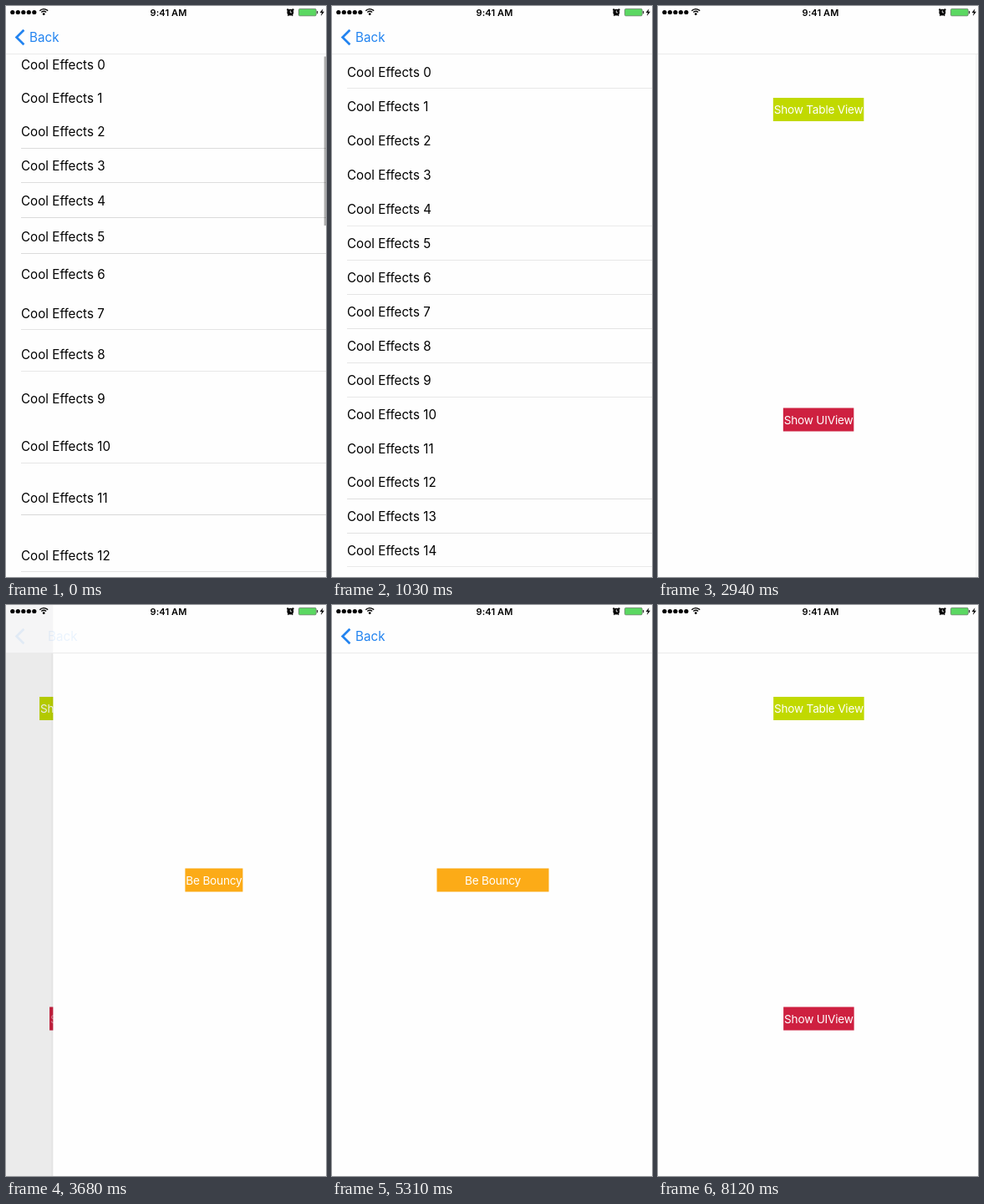
Write an HTML page with a canvas that moves like this. It is 383 px wide and 684 px high and loops after 8520 ms.

```html
<!DOCTYPE html>
<html lang="en">
<head>
<meta charset="utf-8">
<title>Cool Effects</title>
<style>
  html, body { margin: 0; width: 100%; height: 100%; overflow: hidden; background: #fefefe; }
  canvas { display: block; width: 383px; height: 684px; }
</style>
</head>
<body>
<canvas id="stage" width="383" height="684"></canvas>
<script>
const W = 383, H = 684, LOOP = 8520, TICK = 147.6;
const PAPER = '#fefefe', BLUE = '#2384f0';
const ctx = document.getElementById('stage').getContext('2d');

const clamp = v => Math.max(0, Math.min(1, v));
const ramp = (t, from, to) => clamp((t - from) / (to - from));

// Share of the way still to go, critically damped.
function settle(ms) {
  const p = 18.26 * Math.max(0, ms) / 1000;
  return (1 + p) * Math.exp(-p);
}

function rect(x, y, w, h, fill) {
  ctx.fillStyle = fill;
  ctx.fillRect(x, y, w, h);
}

function text(str, x, y, { size = 15.2, color = '#000', align = 'left', weight = 400, spacing = 0 } = {}) {
  ctx.font = `${weight} ${size}px Inter, Roboto, sans-serif`;
  ctx.letterSpacing = spacing + 'px';
  ctx.textAlign = align;
  ctx.fillStyle = color;
  ctx.fillText(str, x, y);
}

function path(points, { stroke, fill, width = 1 }) {
  ctx.beginPath();
  points.forEach(([x, y]) => ctx.lineTo(x, y));
  if (fill) { ctx.fillStyle = fill; ctx.fill(); }
  if (stroke) { ctx.strokeStyle = stroke; ctx.lineWidth = width; ctx.stroke(); }
}

function disc(x, y, r, fill = '#000') {
  ctx.beginPath();
  ctx.arc(x, y, r, 0, 2 * Math.PI);
  ctx.fillStyle = fill;
  ctx.fill();
}

function button(label, cx, y, width, fill, titleAlpha = 1) {
  rect(cx - width / 2, y, width, 28, fill);
  text(label, cx, y + 19, { size: 13.6, color: `rgba(255,255,255,${titleAlpha})`, align: 'center', spacing: -0.2 });
}

function statusBar() {
  for (let i = 0; i < 5; i++) disc(7.8 + 6.5 * i, 7.5, 2.6);
  ctx.strokeStyle = '#000';
  ctx.lineWidth = 1.4;
  for (const r of [3.9, 6.6]) {
    ctx.beginPath();
    ctx.arc(45.2, 10.2, r, -2.4, -0.74);
    ctx.stroke();
  }
  disc(45.2, 9.7, 1.4);
  text('9:41 AM', 194.5, 11.8, { size: 11, weight: 600, align: 'center', spacing: 0.1 });

  disc(340.3, 7.6, 3.9);
  disc(337.2, 4.4, 1.2);
  disc(343.4, 4.4, 1.2);
  path([[337.5, 11.8], [338.6, 10]], { stroke: '#000', width: 1.3 });
  path([[343.1, 11.8], [342, 10]], { stroke: '#000', width: 1.3 });
  path([[340.3, 5.3], [340.3, 7.9], [342.3, 7.9]], { stroke: '#fff', width: 0.8 });

  ctx.beginPath();
  ctx.roundRect(350.4, 3.4, 20.8, 8.4, 1.3);
  ctx.fillStyle = '#5bd862';
  ctx.fill();
  ctx.strokeStyle = '#59705a';
  ctx.lineWidth = 0.7;
  ctx.stroke();
  rect(372, 6, 1.2, 3.2, '#333');
  path([[379.4, 3.2], [375.6, 8.1], [378, 8.1], [376.8, 12], [381, 6.8], [378.5, 6.8]], { fill: '#000' });
}

function navBar(cover, backAlpha) {
  rect(0, 0, W, 57, PAPER);
  rect(0, 0, W * (1 - cover), 57, `rgba(60,70,85,${0.055 * cover})`);
  rect(0, 57, W, 1, '#ebebeb');
  ctx.globalAlpha = backAlpha;
  path([[21.4, 28.8], [12.6, 37.5], [21.4, 46.2]], { stroke: BLUE, width: 2.7 });
  text('Back', 28 + 150 * (1 - cover), 43, { color: BLUE });
  ctx.globalAlpha = 1;
}

function menu(cover, uiViewPressed) {
  const cx = 192.4 - 115 * cover;
  button('Show Table View', cx, 110, 108.5, '#c1d900');
  button('Show UIView', cx, 481.5, 84.5, '#ce2040', uiViewPressed ? 0.45 : 1);
  rect(0, 57, W, H - 57, `rgba(0,0,0,${0.087 * cover})`);
}

// Rows rise from below one after another, each on an underdamped spring.
function rowOffset(row, t) {
  const a = 3.54 + 3.19 * t / 1000 - 0.154 * row;
  return H * Math.exp(-a / 0.75) * (Math.cos(a) + Math.sin(a) / 0.75);
}

function tableView(t) {
  for (let row = 0; row < 16; row++) {
    const top = 58 + 41.07 * row + rowOffset(row, t);
    text('Cool Effects ' + row, 18, top + 26.5);
    // Hairlines fade out when they fall between two pixel rows.
    const line = top + 40.2, snapped = Math.round(line);
    const miss = Math.abs(line - snapped);
    if (miss < 0.38) rect(18, snapped, W - 18, 1, `rgba(0,0,0,${0.15 - 0.2 * miss})`);
  }
  const bar = 1 - 0.4 * ramp(t, 430, 590) - 0.6 * ramp(t, 590, 880);
  if (bar > 0) rect(380.7, 60.5, 2.3, 202.5, `rgba(0,0,0,${0.32 * bar})`);
}

function bouncyView(t) {
  let grow = 0;
  if (t > 4990) {
    const s = (t - 4990) / 1000;
    grow = 50 * (1 - Math.exp(-3.72 * s) * Math.cos(9.7 * s));
  }
  grow *= 1 - ramp(t, 6100, 6480);
  button('Be Bouncy', 192.5, 315.5, 69 + grow, '#fcab17');
}

function draw(t) {
  let cover;
  if (t < 3504) cover = settle(t - 2510);
  else if (t < 6938) cover = 1 - settle(t - 3504);
  else cover = settle(t - 6938);

  let backAlpha;
  if (t < 3504) backAlpha = t < 2190 ? 1 : 0.2 * cover;
  else if (t < 6938) backAlpha = t < 6600 ? ramp(t, 3630, 4300) : 0.2;
  else backAlpha = 0.2 * cover;

  rect(0, 0, W, H, PAPER);
  menu(cover, t > 3200 && t < 4400);

  if (cover > 0.0005) {
    ctx.save();
    ctx.translate(W * (1 - cover), 0);
    if (cover < 0.999) rect(-2, 57, 2, H - 57, 'rgba(0,0,0,0.035)');
    rect(0, 57, W, H - 57, PAPER);
    if (t < 3504) tableView(t);
    else bouncyView(t);
    ctx.restore();
  }
  navBar(cover, backAlpha);
  statusBar();
}

// The screen advances in even ticks and holds its last picture.
function play(now) {
  const tick = Math.min(55, Math.floor((now % LOOP + 18) / TICK));
  draw(tick * TICK);
  requestAnimationFrame(play);
}
play(performance.now());
</script>
</body>
</html>
```
